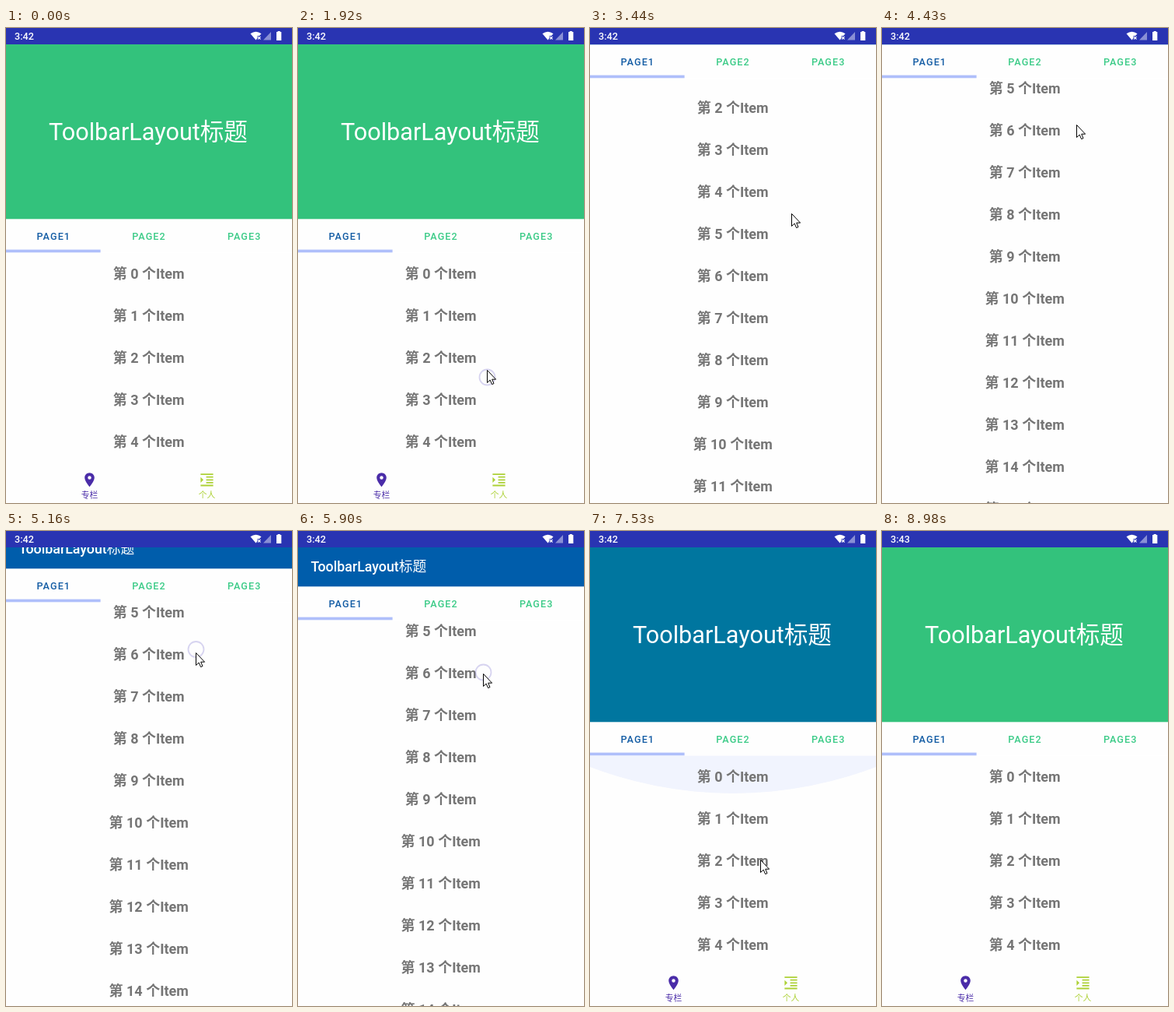
An HTML page with a canvas for the animation above (9.26 s loop, 368 px wide and 610 px high).

```html
<!DOCTYPE html>
<html lang="zh">
<head>
<meta charset="utf-8">
<title>Collapsing toolbar</title>
<style>
html, body { margin: 0; width: 368px; height: 610px; overflow: hidden; background: #fefefe; }
canvas { display: block; }
</style>
</head>
<body>
<canvas id="stage" width="368" height="610"></canvas>
<script>
const ctx = document.getElementById('stage').getContext('2d');
const LOOP = 9260, STEP = 90;
const HEADER = 224, TOOLBAR = 50, RANGE = HEADER - TOOLBAR, STATUS = 21;
const FONT = "Roboto, 'Noto Sans CJK SC', 'Noto Sans CJK JP', 'Noto Sans CJK', sans-serif";
// The blue lies outside the screen's gamut: its red is clipped only after mixing
const BLUE = [-17, 93, 171], GREEN = [51, 194, 124];
const PIN = new Path2D('M12 2C8.13 2 5 5.13 5 9c0 5.25 7 13 7 13s7-7.75 7-13c0-3.87-3.13-7-7-7zm0 9.5a2.5 2.5 0 110-5 2.5 2.5 0 010 5z');
const INDENT = new Path2D('M3 21h18v-2H3v2zM3 8v8l4-4-4-4zm8 9h10v-2H11v2zM3 3v2h18V3H3zm8 6h10V7H11v2zm0 4h10v-2H11v2z');
const ARROW = new Path2D('M.5 .5V16.5L4.2 13.1 6.6 18.6 9 17.6 6.7 12.2H11.6Z');

// Keys: time, then values
const HEADER_KEYS = [[1920, 0], [2460, 224], [4800, 224], [5430, 177], [5810, 177], [5900, 174]];
const LIST_KEYS = [[2460, 0], [2640, 75], [2730, 94], [2810, 97], [3710, 97], [4430, 284],
  [5810, 284], [5900, 283], [6270, 283], [6540, 276]];
const POINTER_KEYS = [[1020, 333, 327], [1650, 245, 466], [1740, 245, 466], [1830, 244, 458],
  [1920, 243, 439], [2640, 241, 143], [2730, 241, 108], [2900, 245, 70], [3710, 266, 322],
  [4430, 250, 124], [4800, 250, 124], [5430, 239, 180], [5810, 239, 180], [5900, 238, 183],
  [6270, 238, 183], [6540, 238, 190]];
const EXIT_KEYS = [[8440, 219, 422], [8980, 325, 612]];
const FLICK = { start: 6630, release: 7380, top: 7490, drag: 232, total: 450 };

const clamp = v => Math.max(0, Math.min(1, v));
const lerp = (a, b, p) => a + (b - a) * p;
const phase = (t, a, b) => clamp((t - a) / (b - a));
const within = (t, a, b) => t >= a && t < b;
const flickPhase = t => phase(t, FLICK.start, FLICK.release) ** 2.5;

function track(t, keys) {
  const i = keys.findIndex(k => k[0] > t);
  if (i === 0) return keys[0].slice(1);
  if (i < 0) return keys[keys.length - 1].slice(1);
  const a = keys[i - 1], b = keys[i], p = phase(t, a[0], b[0]);
  return a.slice(1).map((v, n) => lerp(v, b[n + 1], p));
}

// The picture refreshes every 90 ms, restarting after each pause
function tick(t) {
  const base = [8530, 6360, 5900, 4710, 2810, 1020].find(s => t >= s);
  return base ? base + Math.floor((t - base) / STEP) * STEP : 0;
}

function scrollAt(t) {
  if (t < FLICK.start) return [track(t, HEADER_KEYS)[0], track(t, LIST_KEYS)[0]].map(Math.round);
  const fling = phase(t, FLICK.release, FLICK.top);
  const rest = Math.round(FLICK.total - FLICK.drag * flickPhase(t) - (FLICK.total - FLICK.drag) * fling);
  return [Math.min(RANGE, rest), Math.max(0, rest - RANGE)];
}

function pointerAt(t) {
  if (t > 8440) return track(t, EXIT_KEYS);
  if (t < FLICK.start) return track(t, POINTER_KEYS);
  const p = flickPhase(t);
  return [lerp(238, 219, p), lerp(190, 422, p)];
}

function scrimAt(t) {
  return t < 4500 ? phase(t, 2200, 2800) ** 2 : 1 - phase(t, 7440, 7800);
}

function rect(x, y, w, h, color) {
  ctx.fillStyle = color;
  ctx.fillRect(x, y, w, h);
}

function text(str, x, y, size, weight, color, align = 'center', spacing = 0) {
  ctx.font = `${weight} ${size}px ${FONT}`;
  ctx.letterSpacing = spacing + 'px';
  ctx.textAlign = align;
  ctx.fillStyle = color;
  ctx.fillText(str, x, y);
}

function polygon(points, color) {
  ctx.beginPath();
  points.forEach(p => ctx.lineTo(...p));
  ctx.fillStyle = color;
  ctx.fill();
}

function drawList(t, header, list) {
  const top = 288.5 - header;
  ctx.save();
  ctx.beginPath();
  ctx.rect(0, top, 368, 610);
  ctx.clip();
  if (within(t, 7500, 7600)) {
    ctx.beginPath();
    ctx.arc(184, -178, 515, 0, 7);
    ctx.fillStyle = '#f1f4fe';
    ctx.fill();
  }
  for (let i = 0; i < 20; i++) {
    text(`第 ${i} 个Item`, 183.7, 322 + 54 * i - header - list, 18, 700, '#757575');
  }
  ctx.restore();
}

function drawNav(header) {
  const y = 560 + header;
  rect(0, y, 368, 50, '#fefefe');
  [[107.5, PIN, '专栏', '#4a2ca8'], [258.5, INDENT, '个人', '#add136']].forEach(([x, icon, label, color]) => {
    text(label, x, y + 44, 10.8, 400, color);
    ctx.save();
    ctx.translate(x - 10.8, y + 9.5);
    ctx.scale(0.9, 0.9);
    ctx.fill(icon);
    ctx.restore();
  });
}

function drawHeader(t, header) {
  const bottom = 245.3 - header, scrim = scrimAt(t);
  const color = GREEN.map((v, i) => Math.max(0, Math.round(lerp(v, BLUE[i], scrim))));
  rect(0, bottom - 1, 368, 44, '#fefefe');
  rect(0, 0, 368, bottom, `rgb(${color})`);

  const p = clamp(header / RANGE), lift = Math.max(0, header - RANGE);
  text('ToolbarLayout标题', lerp(55, 16.5, p), lerp(144, 52.3, p) - lift,
    lerp(30.6, 17.8, p), p < 1 ? 400 : 500, '#fff', 'left');

  for (let i = 0; i < 3; i++) {
    text('PAGE' + (i + 1), 368 * (i + 0.5) / 3, 271.5 - header, 12.6, 500,
      i ? '#3bcb87' : '#135ca4', 'center', 1.1);
  }
  rect(0, 284.6 - header, 121.6, 3.7, '#afbffa');
}

function drawStatus(t) {
  rect(0, 0, 368, STATUS, '#2934b2');
  text(t < 8160 ? '3:42' : '3:43', 11, 15, 12.6, 500, '#fff', 'left');

  ctx.beginPath();
  ctx.moveTo(321.5, 15.5);
  ctx.lineTo(314.5, 7.3);
  ctx.quadraticCurveTo(321.5, 2.3, 328.5, 7.3);
  ctx.fillStyle = '#fff';
  ctx.fill();
  rect(323.5, 10, 6, 6, '#2934b2');
  ctx.beginPath();
  ctx.moveTo(324, 11);
  ctx.lineTo(327.5, 14.5);
  ctx.moveTo(327.5, 11);
  ctx.lineTo(324, 14.5);
  ctx.strokeStyle = '#fff';
  ctx.lineWidth = 1.1;
  ctx.stroke();

  polygon([[331, 15.5], [341, 5], [341, 15.5]], 'rgba(255,255,255,.45)');
  rect(348, 5, 6.3, 11, '#fff');
  rect(349.6, 4, 3.1, 1, '#fff');
}

function drawPointer(t) {
  if (!within(t, 1020, 8980)) return;
  if (within(t, 1830, 2780) || within(t, 3800, 4430) || within(t, 4710, 7400)) {
    const [cx, cy] = pointerAt(t - 45);
    ctx.beginPath();
    ctx.arc(cx, cy, 10, 0, 7);
    ctx.fillStyle = 'rgba(255,255,255,.3)';
    ctx.fill();
    ctx.strokeStyle = 'rgba(115,105,205,.28)';
    ctx.lineWidth = 1.8;
    ctx.stroke();
  }
  ctx.save();
  ctx.translate(...pointerAt(t).map(Math.round));
  ctx.fillStyle = '#fff';
  ctx.fill(ARROW);
  ctx.strokeStyle = '#000';
  ctx.lineWidth = 1;
  ctx.stroke(ARROW);
  ctx.restore();
}

function draw() {
  const t = tick(performance.now() % LOOP);
  const [header, list] = scrollAt(t);
  rect(0, 0, 368, 610, '#fefefe');
  drawList(t, header, list);
  drawNav(header);
  drawHeader(t, header);
  drawStatus(t);
  drawPointer(t);
  requestAnimationFrame(draw);
}
draw();
</script>
</body>
</html>
```
